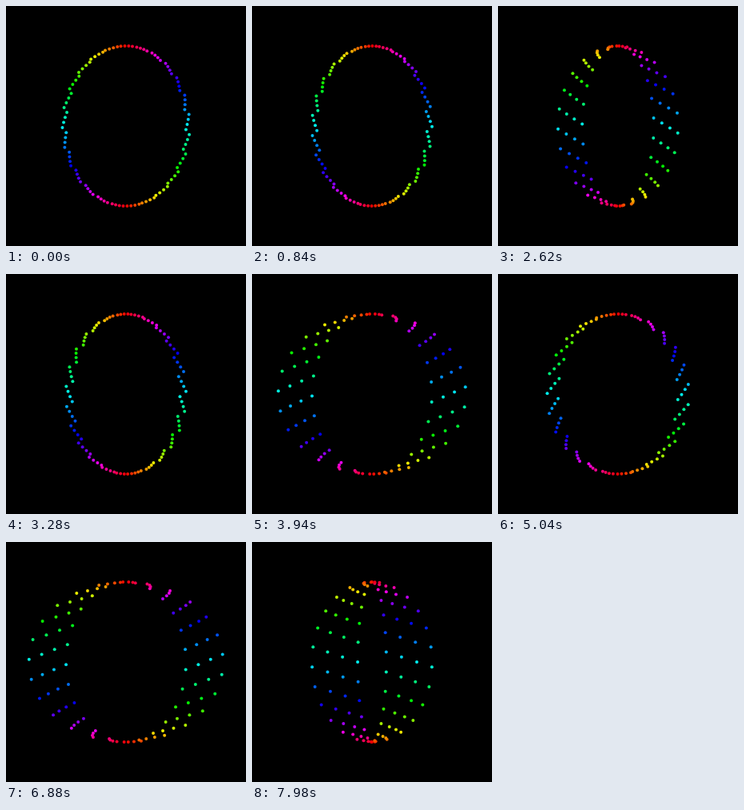
An HTML page for the animation above (8000 ms loop, 300 px wide and 300 px high).

```html
<!DOCTYPE html>
<html lang="en">
<head>
<meta charset="utf-8">
<title>Spinning dot ring</title>
<style>
  html, body { margin: 0; width: 100%; height: 100%; overflow: hidden; background: #000; }
  svg { display: block; width: 100%; height: 100%; }
</style>
</head>
<body>
<svg viewBox="0 0 300 300"></svg>
<script>
const COUNT = 100, LOOP = 8000, STEP = 20;
const TAU = Math.PI * 2;
const SWING = 5000 / 3;   // ms per swing of the strands
const TURN = SWING * 4;   // ms per turn of the ring

const svg = document.querySelector('svg');
const dots = Array.from({ length: COUNT }, () => {
  const dot = document.createElementNS('http://www.w3.org/2000/svg', 'circle');
  dot.setAttribute('r', 2);
  return svg.appendChild(dot);
});

function draw(ms) {
  const t = Math.floor(ms / STEP) * STEP + STEP;
  const spread = 20 * Math.sin(TAU * t / SWING);
  dots.forEach((dot, i) => {
    const angle = TAU * (t / TURN + i / COUNT);
    const rx = 75 + spread * ((i + 1) % 4);
    // Two full colour wheels around the ring, red at top and bottom
    const hue = (angle * 720 / TAU + 180) % 360;
    dot.setAttribute('cx', (150 + rx * Math.cos(angle)).toFixed(2));
    dot.setAttribute('cy', (150 - 100 * Math.sin(angle)).toFixed(2));
    dot.setAttribute('fill', `hsl(${hue.toFixed(1)}, 100%, 47%)`);
  });
}

const start = performance.now();
function tick() {
  draw((performance.now() - start) % LOOP);
  requestAnimationFrame(tick);
}
draw(0);
requestAnimationFrame(tick);
</script>
</body>
</html>
```
